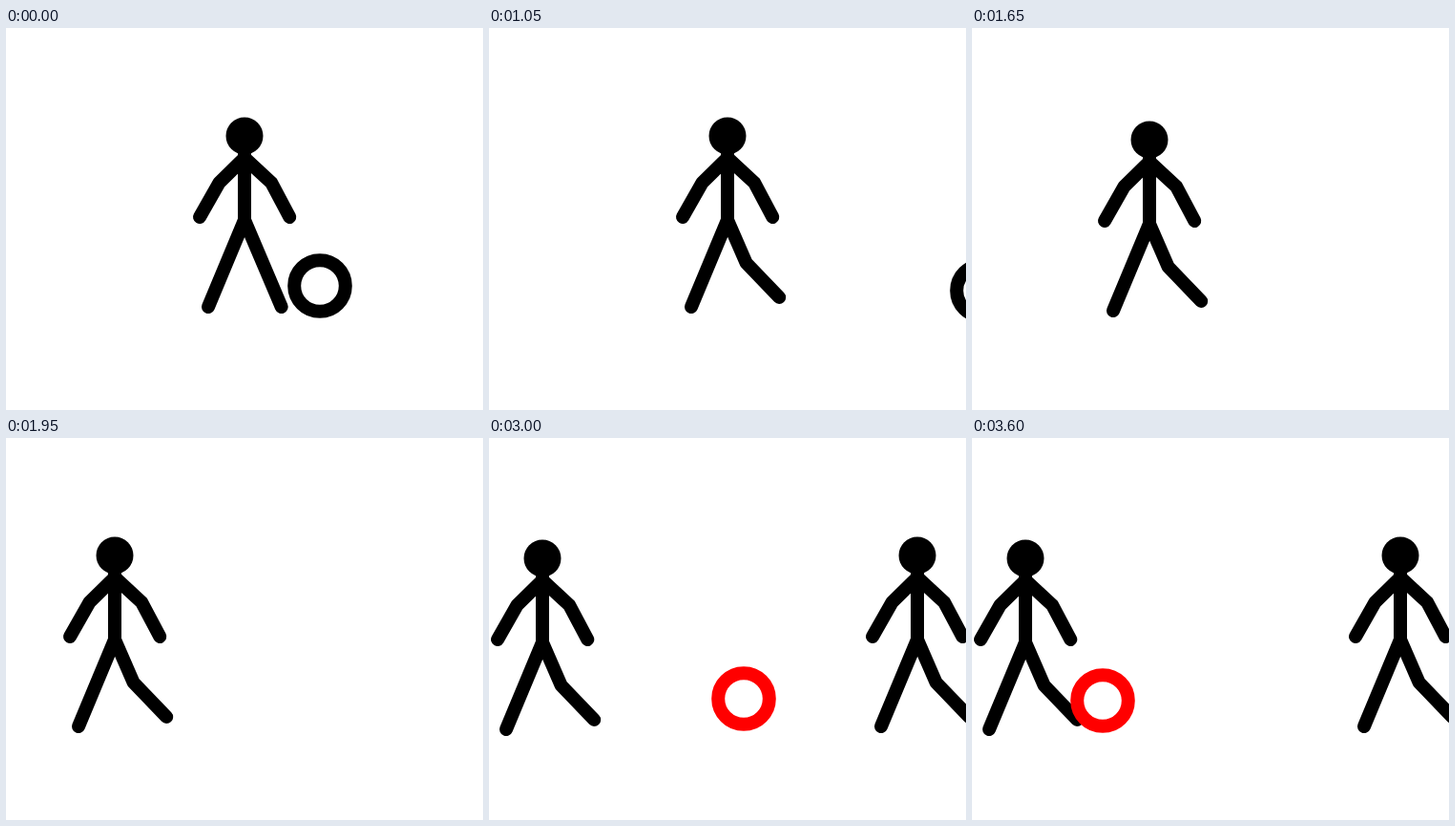
An HTML page with a canvas that plays this animation: 500x400 px, repeating every 3.75 s.

```html
<!DOCTYPE html>
<html lang="en">
<head>
<meta charset="utf-8">
<title>Passing the ball</title>
<style>
  html, body { margin: 0; width: 100%; height: 100%; overflow: hidden; background: #fff; }
  canvas { display: block; }
</style>
</head>
<body>
<canvas id="stage" width="500" height="400"></canvas>
<script>
const ctx = document.getElementById('stage').getContext('2d');
const STEP_MS = 150, STEPS = 25;
const BALL_GONE = 9, BALL_BACK = 16;

// Key poses as [step, x, y]; positions between them are interpolated.
const kick = [[1, 329, 270], [2, 346, 270], [4, 391, 272], [5, 426, 272], [7, 517, 275]];
const walk = [[7, 0, 0], [8, -1, -1], [9, -1, -1], [11, -64, 4], [13, -136, 10],
  [14, -177, 10], [15, -194, 13]];
const pass = [[16, 388, 273], [17, 369, 273], [19, 310, 274], [20, 267, 273],
  [23, 155, 275], [24, 137, 275]];

// Position on a path at a step, held at both ends and snapped to whole pixels.
function along(path, step) {
  const next = path.findIndex(key => key[0] >= step);
  if (next === 0) return path[0].slice(1);
  if (next < 0) return path[path.length - 1].slice(1);
  const [from, to] = [path[next - 1], path[next]];
  const part = (step - from[0]) / (to[0] - from[0]);
  return [1, 2].map(i => Math.floor(from[i] + (to[i] - from[i]) * part));
}

function polyline(...points) {
  ctx.beginPath();
  points.forEach(([x, y]) => ctx.lineTo(x, y));
  ctx.stroke();
}

function drawPerson([dx, dy], kneeBent) {
  const shoulder = [250, 136], hip = [250, 201];
  ctx.save();
  ctx.translate(dx, dy);
  ctx.strokeStyle = ctx.fillStyle = '#000';
  ctx.beginPath();
  ctx.arc(250, 113, 19.5, 0, 2 * Math.PI);
  ctx.fill();
  polyline([250, 125], hip);
  polyline([203, 198], [223.5, 162], shoulder, [278.3, 162.2], [297.3, 198]);
  polyline(hip, [212, 292]);
  if (kneeBent) polyline(hip, [269.6, 246], [304.2, 282]);
  else polyline(hip, [288.7, 292]);
  ctx.restore();
}

function drawBall([x, y], color) {
  ctx.strokeStyle = color;
  ctx.beginPath();
  ctx.arc(x, y, 26.8, 0, 2 * Math.PI);
  ctx.stroke();
}

function draw(step) {
  ctx.clearRect(0, 0, 500, 400);
  ctx.lineWidth = 14;
  ctx.lineCap = ctx.lineJoin = 'round';

  drawPerson(along(walk, step), step > 0);
  if (step < BALL_GONE) drawBall(along(kick, step), '#000');
  if (step >= BALL_BACK) {
    drawBall(along(pass, step), '#f00');
    drawPerson([199, 10], true);
  }
}

function tick() {
  draw(Math.floor(performance.now() / STEP_MS) % STEPS);
  requestAnimationFrame(tick);
}
tick();
</script>
</body>
</html>
```
